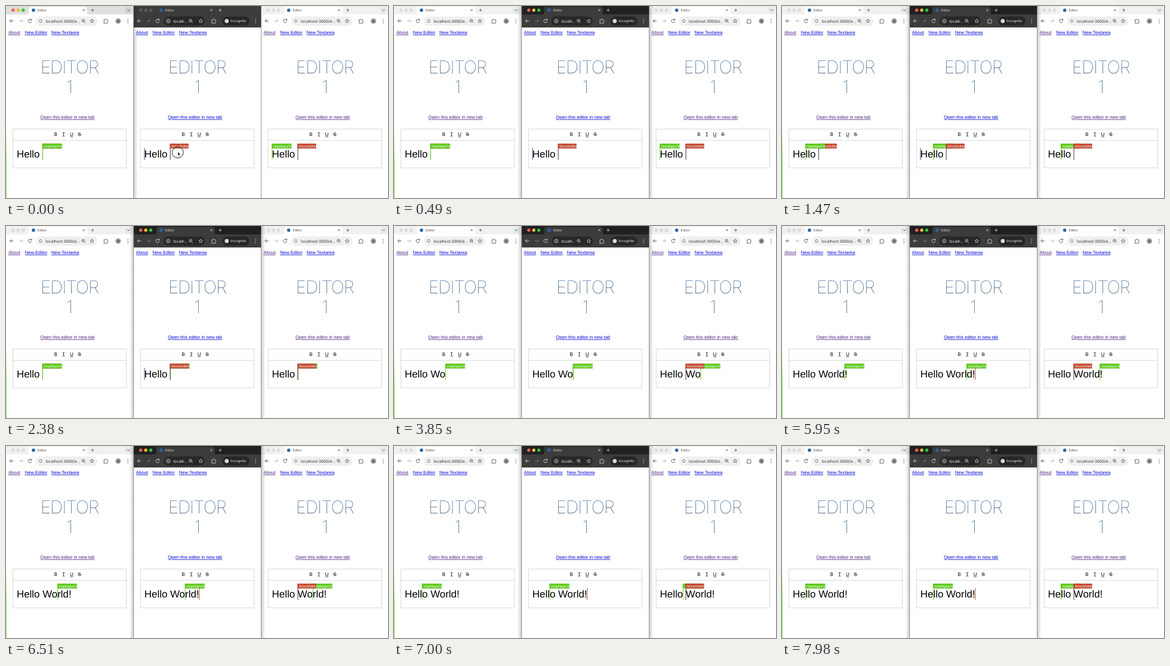
These frames come from a looping animation (640 px wide and 322 px high, 8 s). An HTML page:

```html
<!DOCTYPE html>
<html lang="en">
<head>
<meta charset="utf-8">
<title>Shared editor</title>
<style>
html, body { margin: 0; height: 100%; overflow: hidden; background: #fff; }
svg { display: block; width: 100vw; height: 100vh; text-rendering: geometricPrecision; }
text { font-family: "Liberation Sans", Arial, sans-serif; white-space: pre; }
.link { font-size: 7.65px; text-decoration: underline; text-decoration-thickness: .6px; }
.title { font: 100 29.6px Inter, Roboto, sans-serif; letter-spacing: -.035em; text-anchor: middle; fill: url(#ink); }
.tools { font: 500 8px Inter, sans-serif; text-anchor: middle; fill: #222; }
.ui { font-family: Inter, Roboto, sans-serif; }
.body { font-size: 16.9px; }
.tag { font-size: 5.2px; fill: #fff; }
</style>
</head>
<body>
<svg viewBox="0 0 640 322">
  <defs>
    <linearGradient id="ink" x1="0" y1="0" x2="0" y2="1">
      <stop offset="0" stop-color="#2c6aa8"/><stop offset="1" stop-color="#0c2038"/>
    </linearGradient>
    <linearGradient id="glow" x1="0" y1="0" x2="0" y2="1">
      <stop offset="0" stop-color="#8e4" stop-opacity="0"/><stop offset=".5" stop-color="#8e4"/>
    </linearGradient>
    <linearGradient id="shade">
      <stop offset="0" stop-opacity=".2"/><stop offset="1" stop-opacity="0"/>
    </linearGradient>
    <clipPath id="pane"><rect width="213.8" height="322"/></clipPath>
  </defs>
  <g id="stage"></g>
</svg>
<script>
const LOOP = 8000, STEP = 213.8, TEXT = "Hello World!";
const LEFT = 0, MID = 1, RIGHT = 2;
const LAG = [0, -70, 70];               // each window hears of a move a little apart
const GREEN = { name: "mopd4gyw7e", color: "#5fca1c", line: "#6fd42c", w: 33 };
const RED = { name: "fk2ouh5r8dn", color: "#c4482f", line: "#54302c", w: 31 };

// [time, caret index] of the green user
const MOVES = [[0, 6], [900, 5], [1060, 4], [1220, 3], [1380, 2],
  [1680, 3], [1820, 4], [1960, 5], [2100, 6],
  [3200, 7], [3500, 8], [4060, 9], [4190, 10], [4420, 11], [4700, 12],
  [5820, 11], [6000, 10], [6200, 9], [6400, 8], [6600, 7], [6750, 6],
  [6890, 5], [7000, 4], [7250, 3], [7500, 2]];

const pen = document.createElement("canvas").getContext("2d");
pen.font = '16.9px "Liberation Sans", Arial, sans-serif';
const caretX = i => 18 + pen.measureText(TEXT.slice(0, i)).width;

const rect = (x, y, w, h, fill, more = "") =>
  `<rect x="${x}" y="${y}" width="${w}" height="${h}" fill="${fill}" ${more}/>`;
const dot = (x, y, r, fill, more = "") => `<circle cx="${x}" cy="${y}" r="${r}" fill="${fill}" ${more}/>`;
const text = (x, y, s, cls, more = "") => `<text x="${x}" y="${y}" class="${cls}" ${more}>${s}</text>`;
const path = (d, color, w = .9) => `<path d="${d}" fill="none" stroke="${color}" stroke-width="${w}"/>`;
const caret = (i, color, w = 1) => rect(caretX(i) - .3, 238, w, 20, color);

function star(x, y) {
  let d = "";
  for (let i = 0; i < 10; i++) {
    const a = i * Math.PI / 5, r = i % 2 ? 1.5 : 3.4;
    d += `${i ? "L" : "M"}${(x + r * Math.sin(a)).toFixed(2)} ${(y - r * Math.cos(a)).toFixed(2)}`;
  }
  return path(d + "Z", "currentColor", .7);
}

function chrome(win, active) {
  const dark = win === MID;
  const strip = dark ? (active ? "#1f2020" : "#3b3c3c") : (active ? "#dedfdf" : "#f1f1f1");
  const bar = dark ? "#3c3c3c" : "#fff";
  const pill = dark ? "#282828" : "#efeff0";
  const ink = dark ? "#d8d8d8" : "#4a4a4a", faint = dark ? "#777" : "#b5b5b5";
  const idle = dark ? "#5a5a5a" : "#dadada";
  const lights = active ? ["#fb5d55", "#fabb2e", "#2ac53f"] : [idle, idle, idle];
  const url = dark ? "localh..." : "localhost:3000/e...";
  const end = dark ? 119 : 153;         // right end of the address pill
  const zoom = end - 23;
  let s = rect(0, 0, STEP, 15, strip) + rect(0, 14, STEP, 22, bar) +
    `<path d="M35 14.5Q38 14.5 38 11V5Q38 1.5 41.500 1.500H132.500Q136 1.500 136 5V11Q136 14.500 139 14.500Z" fill="${bar}"/>` +
    lights.map((c, i) => dot(12 + i * 8.4, 7, 2.7, c)).join("") +
    dot(46, 7, 2.8, "#2464a8") +
    text(53, 9.1, "Editor", "ui", `font-size="5.5" fill="${ink}"`) +
    path("M128.600 5.400l3.200 3.200m0-3.200l-3.200 3.200M142.500 7h5M145 4.500v5", ink, .8);
  if (!dark) s += rect(199.5, 1.5, 11, 11, active ? "#d0d1d1" : "#e8e8e8", 'rx="3"') + path("M203 6l2 2 2-2", ink);
  s += path("M12.500 25h-6m2.600-2.700l-2.700 2.700 2.700 2.700", ink) +
    path("M22 25h6m-2.600-2.700l2.700 2.700-2.700 2.700", faint) +
    path("M42.500 23.300a2.900 2.900 0 1 0 .4 2.600M43 21.500v2.200h-2.300", ink) +
    rect(50, 17.5, end - 50, 15.5, pill, 'rx="7.7"') +
    dot(58, 25.2, 5, dark ? "#3c3c3c" : "#fff") +
    dot(58, 25.2, 2.7, "none", `stroke="${ink}" stroke-width=".7"`) + path("M58 24.800v1.900M58 23.400v.7", ink, .7) +
    text(66.5, 27.5, url, "ui", `font-size="6.5" fill="${dark ? "#eee" : "#333"}"`) +
    dot(zoom - .6, 24.6, 2.3, "none", `stroke="${ink}" stroke-width=".8"`) +
    path(`M${zoom + 1} 26.300l2 2M${zoom - 1.8} 24.600h2.400`, ink, .8) +
    `<g color="${ink}">${star(dark ? 112.5 : 144, 25.3)}</g>`;
  const px = dark ? 134 : 167;
  s += path(`M${px - 3} 23h2a1 1 0 0 1 2 0h2v2a1 1 0 0 1 0 2v2h-6v-2a1 1 0 0 0 0-2z`, ink, .8);
  if (dark) {
    s += rect(149, 17.8, 45, 15, "#252626", 'rx="7.5"') + dot(156, 25.2, 3.4, "#d8d8d8") +
      text(162.5, 27.4, "Incognito", "ui", 'font-size="6" fill="#e8e8e8"');
  } else {
    s += dot(188, 25.2, 4.6, "#a9aaa8") + dot(188, 25.6, 2.8, "#737572");
  }
  return s + [22.4, 25.2, 28].map(y => dot(204.3, y, .7, ink)).join("");
}

function page(win) {
  const blue = "#0000d8", seen = win === MID ? blue : "#4b1f80";
  const tools = ["B", "I", "U", "S"].map((c, i) => text(83.3 + i * 13.3, 218.2, c, "tools")).join("");
  return rect(0, 36, STEP, 286, "#fff") +
    text(4, 47, "About", "link", `fill="${seen}"`) +
    text(31.7, 47, "New Editor", "link", `fill="${blue}"`) +
    text(76, 47, "New Textarea", "link", `fill="${blue}"`) +
    text(106.5, 113, "EDITOR", "title") + text(106.5, 146, "1", "title") +
    text(57.5, 189.3, "Open this editor in new tab", "link", `fill="${seen}"`) +
    rect(11.5, 206.3, 190.3, 65, "#fff", 'stroke="#cfcfcf" stroke-width=".8"') +
    path("M11.500 225.300h190.300", "#cfcfcf", .8) + tools +
    path("M94.600 212.600h4M94.600 218.200h4M107.500 219.500h5M120.400 215.300h6", "#222", .7);
}

function flag(user, i) {
  const x = caretX(i) - .3;
  return rect(x, 231, 1, 27, user.line) +
    rect(x + .6, 231.6, user.w, 8, "#000", 'opacity=".15" rx="1"') +
    rect(x, 230.7, user.w, 8, user.color, 'rx=".8"') +
    text(x + 2.6, 236.5, user.name, "tag");
}

function editor(win, t) {
  const past = MOVES.filter(m => m[0] <= Math.max(0, t + -LAG[win]));
  let pos = past[past.length - 1][1];
  const length = Math.max(...past.map(m => m[1]));
  if (win === RIGHT && t < 500) pos = 0;
  const typed = length > 6;
  const green = win === MID && t < 500 ? "" : flag(GREEN, pos);
  const red = typed && win !== RIGHT ? "" : flag(RED, 6);
  let s = text(18, 254, TEXT.slice(0, length), "body");
  if (win === MID) s += typed ? caret(length, "#a5552c") : caret(0, "#2b4a86");
  return s + (win === LEFT ? red + green : green + red);
}

function pointer(t) {
  if (t >= 400) return "";
  const ring = t < 70 ? dot(287.7, 245.5, 9.4, "none", 'stroke="#222" stroke-width="1"') : "";
  return ring + '<path d="M288 244.500v6.200l1.500-1.300 1 2.100 1-.5-1-2h1.900z" fill="#111" stroke="#fff" stroke-width=".4"/>';
}

function scene(t) {
  const front = t < 70 ? LEFT : MID;
  let s = "";
  for (const win of [LEFT, MID, RIGHT]) {
    s += `<g transform="translate(${win * STEP})"><g clip-path="url(#pane)">` +
      page(win) + chrome(win, win === front) + editor(win, t) + "</g></g>";
  }
  const edge = (front + 1) * STEP;
  s += rect(edge, 0, 7, 322, "url(#shade)");
  if (front === MID) s += `<g transform="translate(${STEP}) scale(-1 1)">${rect(0, 0, 7, 322, "url(#shade)")}</g>`;
  s += [1, 2].map(i => rect(i * STEP - .4, 0, .8, 322, "#777")).join("");
  return s + rect(0, 200, 1, 122, "url(#glow)") + pointer(t);
}

const stage = document.getElementById("stage");
let shown = "";
function frame(now) {
  const next = scene(now % LOOP);
  if (next !== shown) stage.innerHTML = shown = next;
  requestAnimationFrame(frame);
}
requestAnimationFrame(frame);
</script>
</body>
</html>
```
